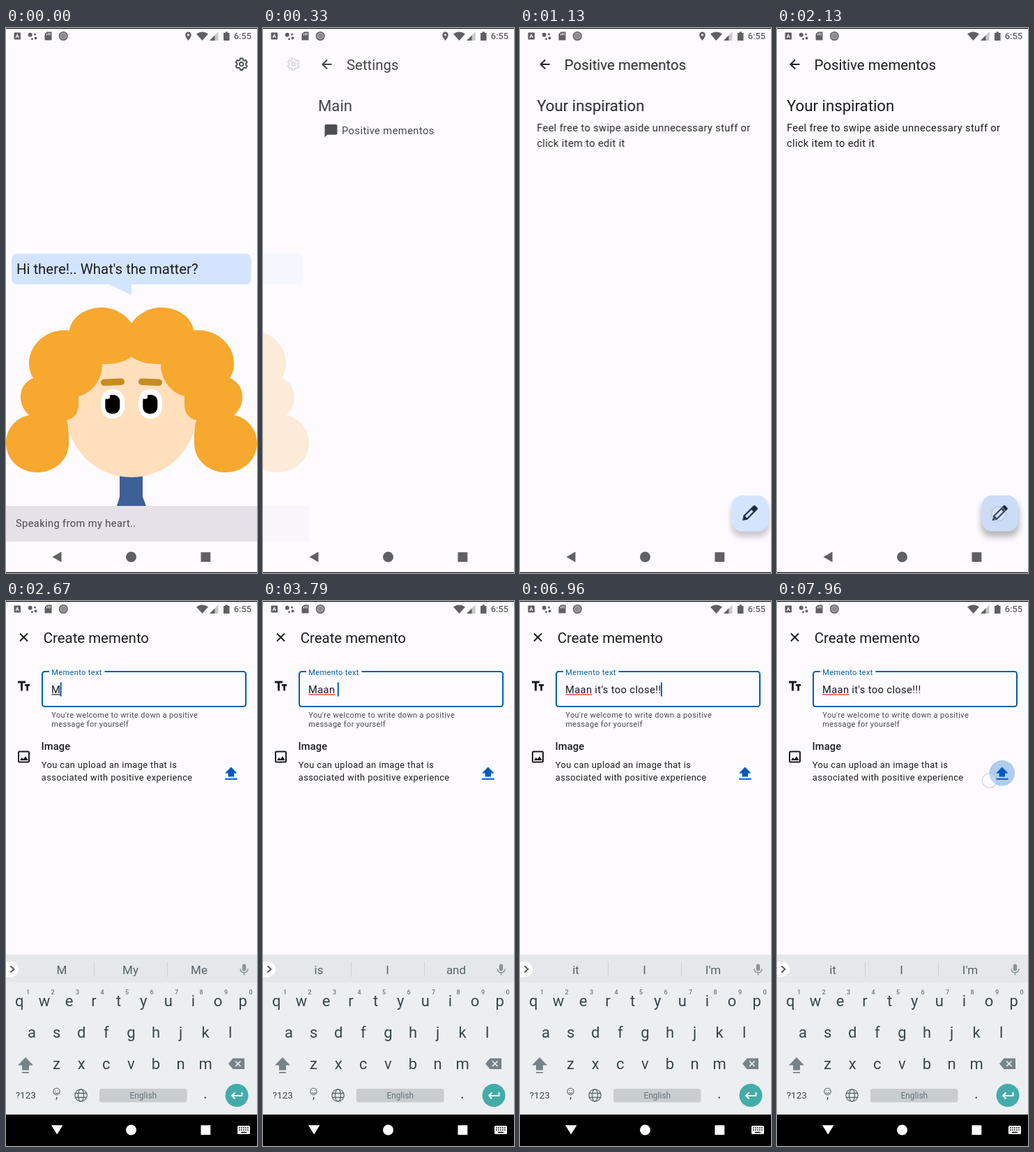
Animation of 360x780 px, one loop 8000 ms. Source, as an HTML page:

```html
<!DOCTYPE html>
<html lang="en">
<head>
<meta charset="utf-8">
<title>Memento app</title>
<style>
  html, body { margin: 0; width: 100%; height: 100%; overflow: hidden; background: #fdfbff; }
  svg { display: block; width: 360px; height: 780px; font-family: Roboto, sans-serif; fill: #1b1b1f; }
  text { white-space: pre; }
  .title { font-size: 20.4px; }
  .head { font-size: 22.2px; }
  .body { font-size: 14.67px; letter-spacing: .38px; }
  .body.wide { letter-spacing: .44px; }
  .body.tight { letter-spacing: .345px; }
  .medium { font-size: 12.83px; letter-spacing: .4px; }
  .small { font-size: 11px; letter-spacing: .37px; }
  .mid { text-anchor: middle; }
  .line { fill: none; stroke: #1b1b1f; stroke-width: 2; }
  .keys { fill: #37474f; }
  .key { font-size: 22px; text-anchor: middle; }
  .hint { font-size: 9px; font-weight: 500; text-anchor: middle; fill: #6b777d; }
  .word { font-size: 17px; text-anchor: middle; fill: #56636a; }
  .word.best { font-weight: 700; fill: #101416; }
</style>
</head>
<body>
<svg viewBox="0 0 360 780">
  <defs>
    <g id="half">
      <path fill="#f6a82f" d="M180.5 423C170 408 154 400 137 400C113 400 93 415 91 433C60 429 33 452 33 480C33 488 35 494 39 501C27 506 21 516 21 528C21 538 25 547 33 554C13 558 0 575 0 594C0 618 20 636 45 636C70 636 90 618 90 594V585C90 576 89 568 87 561C97 560 104 551 104 540V527C124 522 138 503 138 481C158 481 170 478 180.5 470Z"/>
      <rect x="136" y="502" width="34" height="9.5" rx="4.7" fill="#c68b22" transform="rotate(-2 153 507)"/>
      <rect x="136" y="517" width="34" height="42" rx="16.5" fill="#fff"/>
    </g>
    <g id="pupil">
      <rect x="142.3" y="525" width="21" height="27" rx="9" fill="#000"/>
      <circle cx="145.5" cy="527.5" r="3.6" fill="#fff"/>
    </g>
    <path id="back" class="line" d="M32.5 52H20M26 45.5L19.5 52L26 58.5"/>
    <filter id="shade" x="-40%" y="-40%" width="180%" height="180%"><feGaussianBlur stdDeviation="5"/></filter>
  </defs>
  <rect width="360" height="780" fill="#fdfbff"/>

  <g id="home">
    <g transform="translate(337.7 51.7)" fill="none" stroke="#44474e" stroke-width="1.8" stroke-linejoin="round">
      <path id="gear"/>
      <circle r="2.7"/>
    </g>
    <rect x="8" y="323" width="343.5" height="44" rx="8" fill="#d3e4ff"/>
    <path d="M146 366H180V382Z" fill="#d3e4ff"/>
    <text class="title" x="14.9" y="352">Hi there!.. What's the matter?</text>
    <path d="M163 630H196V671L201 684H159L163 671Z" fill="#3e6096"/>
    <ellipse cx="180" cy="551" rx="93" ry="92" fill="#ffdfbc"/>
    <use href="#half"/>
    <use href="#half" transform="matrix(-1 0 0 1 360 0)"/>
    <use href="#pupil"/>
    <use href="#pupil" x="54"/>
    <rect y="684" width="360" height="51" fill="#e6e1e8"/>
    <text class="body" x="14" y="714" fill="#49464f">Speaking from my heart..</text>
  </g>

  <g id="settings">
    <use href="#back"/>
    <text class="title" x="54" y="60">Settings</text>
    <text class="head" x="13" y="119">Main</text>
    <path fill="#25282c" d="M24.3 138H38.7Q40.5 138 40.5 139.8V151Q40.5 152.8 38.7 152.8H26.2L22.5 156.5V139.8Q22.5 138 24.3 138Z"/>
    <text class="body wide" x="47" y="152">Positive mementos</text>
    <g fill="#0061a4"><circle cx="318.4" cy="147" r="1.9"/><circle cx="323" cy="147" r="1.9"/><circle cx="327.6" cy="147" r="1.9"/></g>
  </g>

  <g id="list">
    <use href="#back"/>
    <text class="title" x="53.6" y="60">Positive mementos</text>
    <text class="head" x="14" y="119">Your inspiration</text>
    <text class="body tight" x="14" y="148">Feel free to swipe aside unnecessary stuff or</text>
    <text class="body tight" x="14" y="170">click item to edit it</text>
    <rect id="shadow" x="293" y="677" width="54" height="51" rx="14" fill="#000" filter="url(#shade)"/>
    <rect id="fab" x="293.8" y="669" width="51.7" height="51.5" rx="14.7"/>
    <g transform="translate(318.8 695) rotate(45)" fill="#15233b">
      <rect x="-2.9" y="-7" width="5.8" height="15" fill="none" stroke="#15233b" stroke-width="2.2"/>
      <rect x="-3.9" y="-14" width="7.8" height="7.5" rx="1.6"/>
      <path d="M-3.9 8H3.9L0 14Z"/>
    </g>
  </g>

  <g id="create">
    <path class="line" d="M20 46.5L31 57.5M31 46.5L20 57.5"/>
    <text class="title" x="53.8" y="60">Create memento</text>
    <path d="M17 114.5H28V117.5H24V128.5H21V117.5H17ZM27 119H34.2V121.8H32V128.5H29.2V121.8H27Z"/>
    <rect x="52" y="101" width="292" height="50" rx="3.5" fill="none" stroke="#0061a4" stroke-width="2"/>
    <rect x="62" y="99" width="79.5" height="4" fill="#fdfbff"/>
    <text class="small" x="65.3" y="106" fill="#0061a4">Memento text</text>
    <text id="typed" class="body" x="65" y="132"></text>
    <rect id="compose" y="133.3" height="1.2"/>
    <rect id="typo" x="65.5" y="133" width="38" height="1.8" fill="#e46a5c"/>
    <rect id="cursor" y="116.5" width="2" height="20" fill="#0061a4"/>
    <g class="small" fill="#46464f">
      <text x="65.3" y="166.8">You're welcome to write down a positive</text>
      <text x="65.3" y="180">message for yourself</text>
    </g>
    <rect class="line" x="18" y="215.5" width="15" height="15" rx="1.5"/>
    <path d="M20 228L22.8 224L25 226.3L28 222.3L31.8 228Z"/>
    <text x="50.5" y="213" font-size="14.67" font-weight="500" letter-spacing=".14">Image</text>
    <text class="medium" x="50.8" y="238.6">You can upload an image that is</text>
    <text class="medium" x="50.8" y="256.9">associated with positive experience</text>
    <circle id="ripple" cx="322.8" cy="246.3" fill="#0061c8" fill-opacity=".3"/>
    <path fill="#0059bd" d="M322.8 237.5L331.5 246.5H327V251.5H318.6V246.5H314.1ZM314 253.7H331.7V255.8H314Z"/>
  </g>

  <g id="keyboard" class="keys">
    <rect y="506" width="360" height="230" fill="#eceff1"/>
    <rect y="506" width="360" height="40" fill="#e4e8ea"/>
    <path d="M0 516H7A11 11 0 0 1 7 538H0Z" fill="#fff"/>
    <path d="M6.5 522.5L11.5 527L6.5 531.5" fill="none" stroke="#4a5358" stroke-width="1.8"/>
    <path d="M126.5 516V538M231.5 516V538" stroke="#cdd3d6"/>
    <text class="word" x="80" y="533.5"></text>
    <text class="word" x="178.5" y="533.5"></text>
    <text class="word" x="277" y="533.5"></text>
    <rect x="338.8" y="519.5" width="5.4" height="10" rx="2.7" fill="#8a959a"/>
    <path d="M336 526.5A5.5 5.5 0 0 0 347 526.5M341.5 532V535.5" fill="none" stroke="#8a959a" stroke-width="1.5"/>
    <g id="letters"></g>
    <g fill="#76848a">
      <path d="M28 653L39 664.5H33V671.5H23V664.5H17Z"/>
      <rect x="23" y="674" width="10" height="1.8"/>
      <path d="M325.5 654.5H342V670H325.5L319 662.2Z"/>
    </g>
    <path d="M329 658.5L336.5 666M336.5 658.5L329 666" stroke="#eceff1" stroke-width="1.7"/>
    <text class="mid" x="28.3" y="712" font-size="13.5">?123</text>
    <g fill="none" stroke="#5a696f" stroke-width="1.1">
      <circle cx="72.5" cy="702" r="4.7"/>
      <path d="M70 703.3Q72.5 706 75 703.3M70.8 700.2V701.2M74.2 700.2V701.2"/>
      <g stroke-width="1.3">
        <circle cx="107.5" cy="707.5" r="8.7"/>
        <ellipse cx="107.5" cy="707.5" rx="4" ry="8.7"/>
        <path d="M99.5 704.5H115.5M99.5 710.5H115.5"/>
      </g>
    </g>
    <text class="mid" x="72.5" y="712" font-size="16">,</text>
    <rect x="134" y="698" width="125.5" height="19.5" rx="3" fill="#c8cdd0"/>
    <text class="mid" x="196.8" y="712" font-size="12" fill="#66737a">English</text>
    <text class="key" x="286" y="712">.</text>
    <circle cx="331" cy="707.5" r="16.5" fill="#44aca8"/>
    <path d="M338.5 703V708H324.5M328.5 703.5L324 708L328.5 712.5" fill="none" stroke="#fff" stroke-width="1.8"/>
  </g>

  <g fill="#605f63">
    <rect x="11.5" y="6.5" width="9.5" height="10" rx="1"/>
    <text class="mid" x="16.2" y="14.3" font-size="8" font-weight="700" fill="#fdfbff">A</text>
    <circle cx="34.7" cy="9.7" r="3"/><circle cx="41.5" cy="9" r="1.5"/><circle cx="42.5" cy="14.5" r="2"/><circle cx="37.5" cy="15.8" r="1.5"/>
    <path d="M58.8 5.5H65.5V17.5H55.5V8.8Z"/>
    <path d="M58.5 8V10.5M60.8 7V10.5M63 7V10.5" stroke="#fdfbff"/>
    <circle cx="82.3" cy="11.5" r="5.8" fill="#a2a1a4" stroke="#605f63" stroke-width="1.5"/>
    <circle cx="82.3" cy="11.5" r="3.3" fill="#8a898c"/>
    <path id="pin" fill-rule="evenodd" d="M261.5 5.5A4.3 4.3 0 0 1 265.8 9.8Q265.8 13 261.5 18Q257.2 13 257.2 9.8A4.3 4.3 0 0 1 261.5 5.5ZM261.5 8.2A1.6 1.6 0 1 0 261.5 11.4A1.6 1.6 0 1 0 261.5 8.2Z"/>
    <path d="M273 8.5Q281.5 2.5 290 8.5L281.5 18Z"/>
    <path d="M304.5 5.5V18H292Z" fill="#c9c8cb"/>
    <path d="M299.5 10.5V18H292Z"/>
    <path d="M312 7H314.5V5.5H318V7H320.5V18H312Z"/>
    <text x="326.8" y="16.3" font-size="12.83" font-weight="500">6:55</text>
  </g>
  <rect width="360" height="1" fill="#000"/>

  <rect id="nav" y="735" width="360" height="45"/>
  <g id="icons">
    <path id="arrow"/>
    <circle cx="179.5" cy="757" r="7.5"/>
    <rect x="279.5" y="750.3" width="13.8" height="13.7"/>
    <g id="imeIcon">
      <rect x="332" y="751" width="18" height="12" rx="1.5"/>
      <path d="M334 754H348M334 757H348" stroke="#000" stroke-width="1.6" stroke-dasharray="1.7 1.3"/>
      <path d="M337 760.5H345" stroke="#000" stroke-width="1.5"/>
    </g>
  </g>
  <rect y="779" width="360" height="1" fill="#000"/>
  <circle id="tap" r="10.3" fill="#fff" fill-opacity=".18" stroke="#aeb4c2" stroke-opacity=".55" stroke-width="1.2"/>
</svg>
<script>
const LOOP = 8000;
const el = Object.fromEntries([...document.querySelectorAll("svg [id]")].map(e => [e.id, e]));
const words = [...document.querySelectorAll(".word")];

// start time and stiffness (1/s) of each screen change
const screens = ["home", "settings", "list", "create"];
const moves = [[20, 10], [860, 20], [2145, 20]];

// time, text, suggestions (* marks the preferred one)
const typing = [
  [0, "", ""],
  [2670, "M", "M My Me"],
  [3040, "Ma", "Ma May Man"],
  [3170, "Maa", "Maa *Mas Mama"],
  [3420, "Maan", "Maan *Man Mean"],
  [3630, "Maan ", "is I and"],
  [4380, "Maan i", "i I it"],
  [4540, "Maan it", "it its it's"],
  [4830, "Maan it'", "it' *it's it'll"],
  [5000, "Maan it's", "it's its it"],
  [5040, "Maan it's ", "a not the"],
  [5330, "Maan it's t", "t *too the"],
  [5420, "Maan it's to", "to too the"],
  [5540, "Maan it's too", "too took tool"],
  [5790, "Maan it's too ", "much late many"],
  [6000, "Maan it's too c", "c *close cold"],
  [6080, "Maan it's too cl", "cl *close clear"],
  [6290, "Maan it's too clo", "clo *close cloudy"],
  [6370, "Maan it's too clos", "clos *close closed"],
  [6500, "Maan it's too close", "close closed closer"],
  [6790, "Maan it's too close!", "it I I'm"],
  [6960, "Maan it's too close!!", "it I I'm"],
  [7330, "Maan it's too close!!!", "it I I'm"]
];

const ramp = (t, from, to) => Math.min(1, Math.max(0, (t - from) / (to - from)));
const show = (node, on) => node.setAttribute("visibility", on ? "visible" : "hidden");
const set = (node, attrs) => { for (const k in attrs) node.setAttribute(k, attrs[k]); };

function buildGear() {
  const tooth = [[6.4, -20], [8.5, -13], [8.5, 13], [6.4, 20]];
  const points = [];
  for (let a = 30; a < 390; a += 60) {
    for (const [r, da] of tooth) {
      const rad = (a + da) * Math.PI / 180;
      points.push(`${r * Math.cos(rad)} ${r * Math.sin(rad)}`);
    }
  }
  set(el.gear, { d: `M${points.join("L")}Z` });
}

function buildKeys() {
  const rows = [["qwertyuiop", 19.3, 580], ["asdfghjkl", 37, 625], ["zxcvbnm", 72.5, 670]];
  const label = (cls, x, y, s) => `<text class="${cls}" x="${x}" y="${y}">${s}</text>`;
  let out = "";
  rows.forEach(([row, x, y], r) => [...row].forEach((c, i) => {
    out += label("key", x + 35.6 * i, y, c);
    if (r === 0) out += label("hint", 31.5 + 35.5 * i, 562.5, (i + 1) % 10);
  }));
  el.letters.innerHTML = out;
}

// part of the way still to go on a critically damped spring
function rest(t, [start, k]) {
  const x = Math.max(0, t - start) * k / 1000;
  return x > 8.5 ? 0 : (1 + x) * Math.exp(-x);
}

function drawScreens(t) {
  const left = moves.map(m => rest(t, m));
  screens.forEach((name, i) => {
    const enter = i ? left[i - 1] : 0;
    const exit = i < moves.length ? 1 - left[i] : 0;
    set(el[name], { transform: `translate(${360 * (enter - exit)} 0)`, opacity: (1 - enter) * (1 - exit) });
  });
}

function drawTyping(t) {
  const [at, text, hints] = typing.findLast(s => s[0] <= t);
  if (el.typed.textContent !== text) el.typed.textContent = text;
  const width = n => n ? el.typed.getSubStringLength(0, n) : 0;
  const wordStart = text.search(/[a-z']+$/i);
  const from = width(Math.max(0, wordStart)), end = width(text.length);
  show(el.compose, wordStart >= 0);
  set(el.compose, { x: 65.5 + from, width: Math.max(0, end - from - .5) });
  show(el.typo, t >= 3790);
  set(el.cursor, { x: 64.4 + end });
  show(el.cursor, !at || t - at < 575);
  const list = hints.split(" ");
  words.forEach((w, i) => {
    const s = list[i] || "";
    w.textContent = s.replace("*", "");
    w.classList.toggle("best", s[0] === "*");
  });
}

function drawSystem(t) {
  const ime = t >= 2300;
  const up = 1 - (1 - ramp(t, 2300, 2520)) ** 3;
  show(el.keyboard, ime);
  set(el.keyboard, { transform: `translate(0 ${230 * (1 - up)})` });
  show(el.pin, t < 2080);
  set(el.nav, { fill: ime ? "#000" : "#fdfbff" });
  set(el.icons, { fill: ime ? "#fff" : "#605f63" });
  set(el.arrow, { d: ime ? "M65 750.3H81.5L73.2 763.5Z" : "M66.5 757L79.5 749.5V764.5Z" });
  show(el.imeIcon, ime);
}

function drawTaps(t) {
  const onFab = t >= 1750 && t < 2170, onUpload = t >= 7630;
  show(el.tap, onFab || onUpload);
  set(el.tap, onFab ? { cx: 318, cy: 695 } : { cx: 304.7, cy: 257 });
  set(el.fab, { fill: t < 2080 ? "#d3e4ff" : "#cbdcf7" });
  set(el.shadow, { opacity: .22 + .06 * ramp(t, 1750, 1880) });
  const grow = ramp(t, 7660, 7900);
  set(el.ripple, { r: onUpload ? 6 + 12.3 * grow : 0, opacity: grow });
}

function frame(now) {
  const t = now % LOOP;
  drawScreens(t);
  drawTyping(t);
  drawSystem(t);
  drawTaps(t);
  requestAnimationFrame(frame);
}

buildGear();
buildKeys();
requestAnimationFrame(frame);
</script>
</body>
</html>
```
